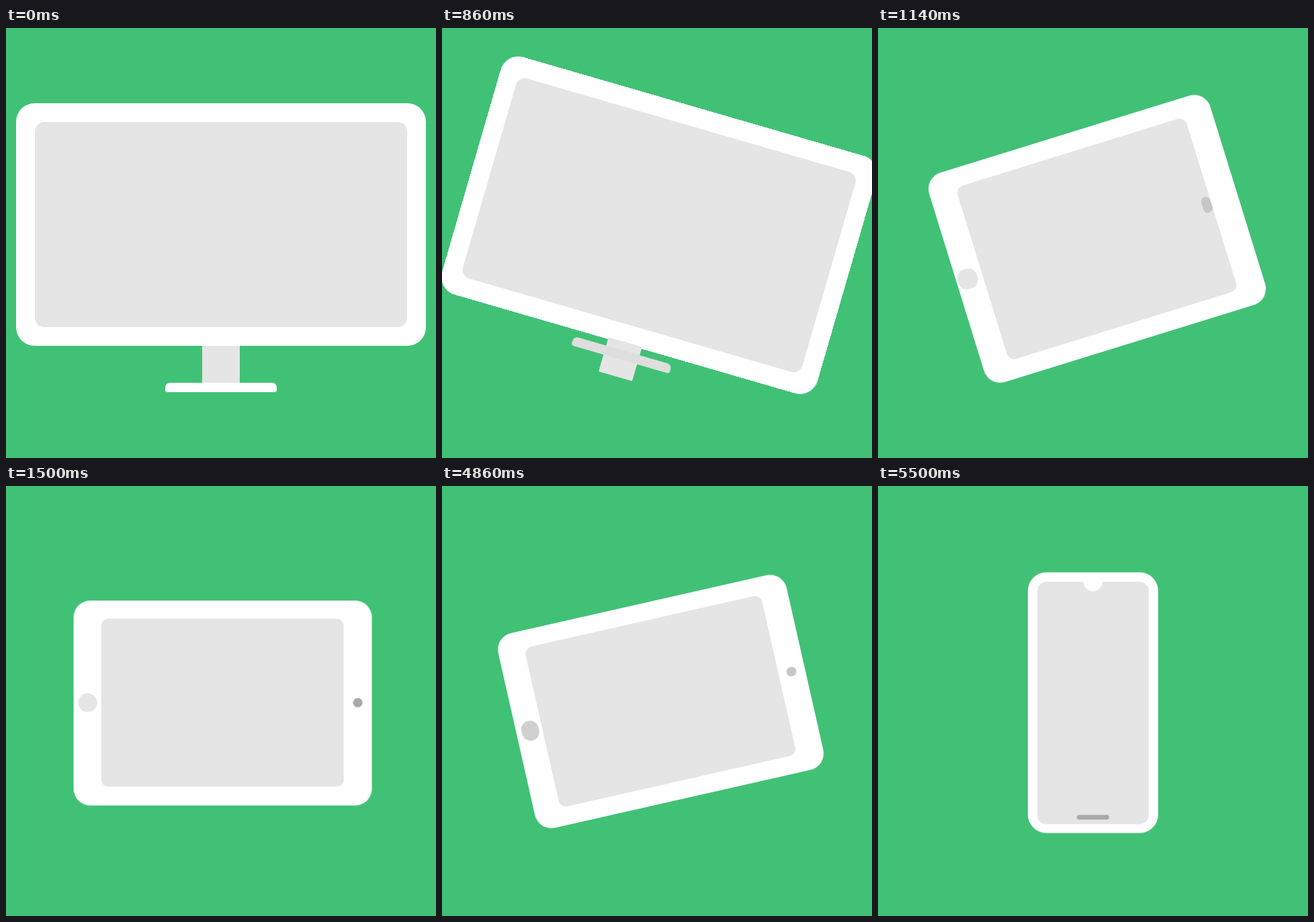
These frames come from a looping animation (640x640 px, 8000 ms). An HTML page:

```html
<!DOCTYPE html>
<html lang="en">
<head>
<meta charset="utf-8">
<title>Monitor, tablet, phone</title>
<style>
  html, body { margin: 0; width: 100%; height: 100%; overflow: hidden; background: #41c176; }
  #device { position: absolute; left: 320px; top: 320px; width: 0; height: 0; transform-origin: 0 0; }
  #device div { position: absolute; }
</style>
</head>
<body>
<div id="device"></div>
<script>
const UNIT = 13.865;
const LOOP = 8000;
const STEP = 40;
const MORPHS = [[480, 1480], [4518, 5498]];
const EASE = {
  size: 'cubic-bezier(1, 0, 0, 1)',
  turn: 'cubic-bezier(.69, 0, .39, 1)',
  tint: 'linear'
};
const WHITE = '#ffffff', LIGHT = '#e5e5e5', GRAY = '#a9a9a9';

// Each part as monitor, tablet, phone: width, height, centre y, top radius, bottom radius, colour.
const PARTS = [
  [[44, 26, -2, 2, 2, WHITE], [22, 32, -2, 1.8, 1.8, WHITE], [14, 28, -2, 2, 2, WHITE]],
  [[40, 22, -2, 1, 1, LIGHT], [18, 26, -2, .8, .8, LIGHT], [12, 26, -2, 1, 1, LIGHT]],
  [[4, 4, 13, 0, 0, LIGHT], [2, 2, 12.5, 1, 1, LIGHT], [3.5, .5, 10.25, .25, .25, GRAY]],
  [[12, 1, 15.5, .5, .25, WHITE], [1, 1, -16.5, .5, .5, GRAY], [2, 2, -15, 1, 1, WHITE]]
];
const TURNS = [[0, 0, 0], [-25.4, 2.5, 90], [0, 30.5, 0]];

const px = n => `${n * UNIT}px`;
const animations = [];

function morph(element, poses, easing) {
  const [[a, b], [c, d]] = MORPHS;
  const times = [0, a, b, c, d, LOOP];
  const frames = times.map((time, i) => ({
    ...poses[i >> 1],
    offset: time / LOOP,
    easing: i % 2 ? easing : 'linear'
  }));
  const animation = element.animate(frames, { duration: LOOP, fill: 'both' });
  animation.pause();
  animations.push(animation);
}

const device = document.getElementById('device');
morph(device, TURNS.map(([x, y, angle]) => ({
  transform: `translate(${x}px, ${y}px) rotate(${angle}deg)`
})), EASE.turn);

for (const poses of PARTS) {
  const part = device.appendChild(document.createElement('div'));
  morph(part, poses.map(([w, h, y, top, bottom]) => ({
    left: px(-w / 2),
    top: px(y - h / 2),
    width: px(w),
    height: px(h),
    borderRadius: `${px(top)} ${px(top)} ${px(bottom)} ${px(bottom)}`
  })), EASE.size);
  morph(part, poses.map(pose => ({ backgroundColor: pose[5] })), EASE.tint);
}

const start = performance.now();

function draw() {
  const time = (performance.now() - start) % LOOP;
  // Motion advances 25 times a second, half a step off zero.
  const held = Math.max(0, Math.floor((time - STEP / 2) / STEP) * STEP + STEP / 2);
  for (const animation of animations) animation.currentTime = held;
  requestAnimationFrame(draw);
}
draw();
</script>
</body>
</html>
```
